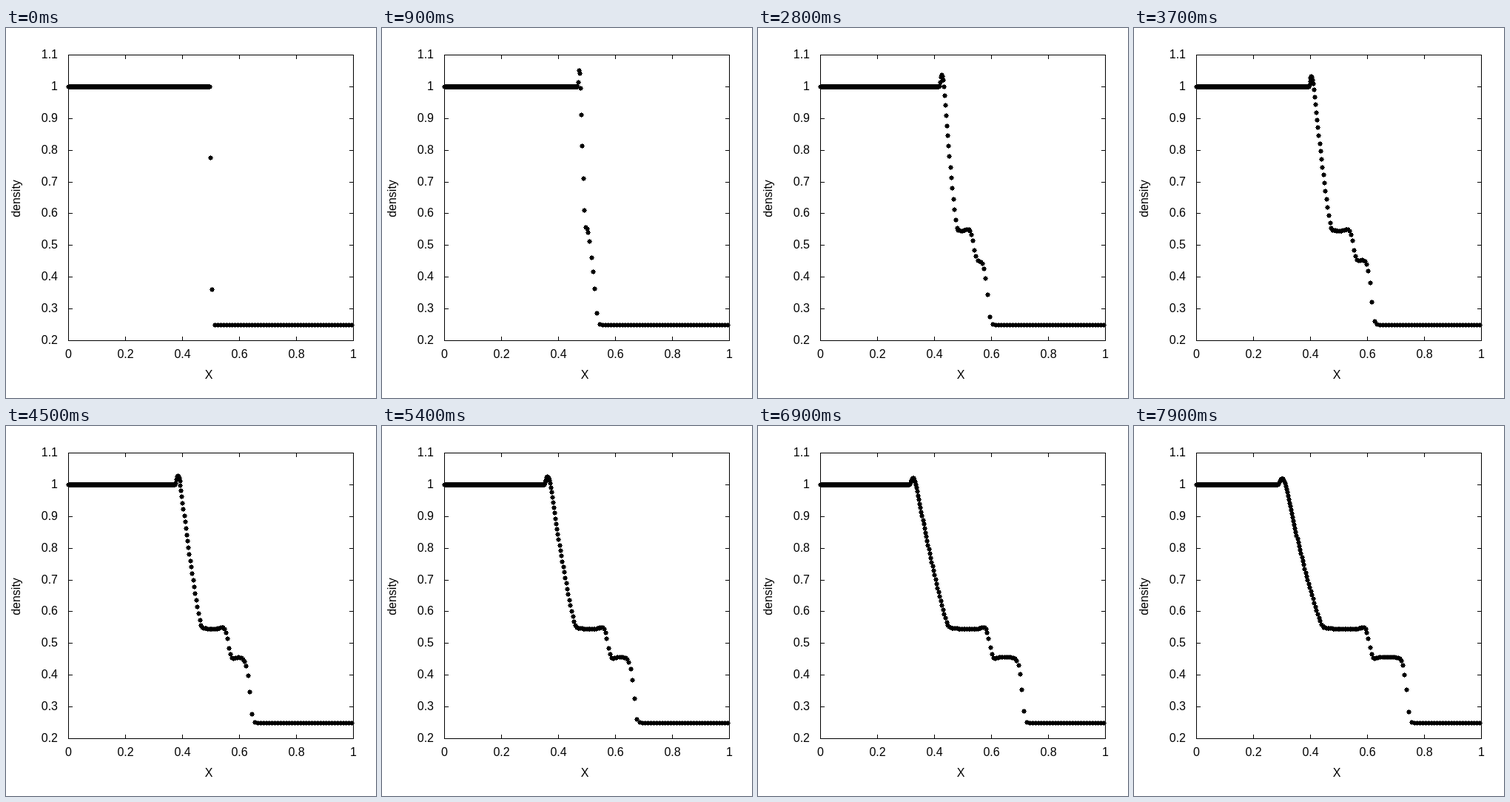
Animation of 500 by 500 pixels, one loop 8 s. Source, as an HTML page with a canvas:

```html
<!DOCTYPE html>
<html lang="en">
<head>
<meta charset="utf-8">
<title>Shock tube density</title>
<style>
html, body { margin: 0; width: 100%; height: 100%; overflow: hidden; background: #fff; }
canvas { display: block; }
</style>
</head>
<body>
<canvas id="plot" width="500" height="500"></canvas>
<script>
const ctx = document.getElementById('plot').getContext('2d');
const LEFT = 84, RIGHT = 469, TOP = 36, BOTTOM = 422;
const WIDTH = RIGHT - LEFT;
const MASS = 0.0025, LEFT_COUNT = 200, RIGHT_COUNT = 50;
const SOUND = 1.1832, CONTACT_SPEED = 0.6735, SHOCK_SPEED = 1.485;

const px = x => Math.round(LEFT + WIDTH * x);
const py = rho => Math.round(BOTTOM - (BOTTOM - TOP) * (rho - 0.2) / 0.9);

// Smoothed Riemann solution after n steps: rarefaction, contact and shock.
function profile(n) {
  n = Math.max(n, 0.01);
  const t = 0.002 * n;
  const spread = 1 - Math.exp(-n / 5);
  const contact = 0.5 + CONTACT_SPEED * t;
  const shock = 0.5 + SHOCK_SPEED * t + 0.003 * spread;

  // Overshoot ahead of the rarefaction, joined to it by a parabola.
  const bump = (1 - Math.exp(-n / 3)) / (13.7 + 0.476 * n);
  const lead = 0.0015 * Math.sqrt(n);
  const peak = 0.5 - SOUND * t - lead;
  const slope = 5 / (6 * SOUND * t);
  const curve = slope * slope / (4 * (slope * lead - bump));

  function fan(x) {
    const y = x - peak;
    if (y < -lead) return 1;
    if (y < 0) return 1 + bump * (1 + Math.cos(Math.PI * y / lead)) / 2;
    if (y < slope / (2 * curve)) return 1 + bump - curve * y * y;
    const base = 5 / 6 - (x - 0.5) / (6 * SOUND * t);
    const a = Math.min(1, Math.max(0.85, base)) ** 5, b = 0.545;
    return (a + b + Math.hypot(a - b, 0.022)) / 2;
  }

  return x => {
    const z = (x - contact) / (0.0095 * spread);
    const step = Math.tanh(z) + 0.13 * z ** 3 * Math.exp(-z * z / 2);
    const d = (x - shock) * WIDTH / spread;
    const front = (1 - Math.tanh(d / 5 + (d > 0 ? 0.026 * d * d : 0))) / 2;
    return 0.25 + (fan(x) - 0.045 * (1 + step) - 0.25) * front;
  };
}

// Equal-mass particles, spaced by the density, starting from one wall.
function march(rho, x, dir, count, visit) {
  for (let i = 0; i < count; i++) {
    visit(x, rho(x), i === count - 1);
    const half = x + dir * MASS / rho(x) / 2;
    x += dir * MASS / rho(half);
  }
}

function marker(x, y) {
  const cx = px(x), cy = py(y);
  ctx.fillRect(cx - 3, cy, 7, 1);
  ctx.fillRect(cx - 2, cy - 2, 5, 5);
  ctx.fillRect(cx, cy - 3, 1, 7);
}

function label(text, x, y, align) {
  ctx.textAlign = align;
  ctx.fillText(text, x, y);
}

function axes() {
  ctx.font = '16px "Liberation Sans", Arial, sans-serif';
  ctx.strokeRect(LEFT + 0.5, TOP + 0.5, WIDTH, BOTTOM - TOP);
  for (let k = 0; k <= 9; k++) {
    const y = py(0.2 + k / 10);
    ctx.fillRect(LEFT, y, 6, 1);
    ctx.fillRect(RIGHT - 5, y, 6, 1);
    label(String((k + 2) / 10), 70, y + 5, 'right');
  }
  for (let k = 0; k <= 5; k++) {
    const x = px(k / 5);
    ctx.fillRect(x, TOP, 1, 6);
    ctx.fillRect(x, BOTTOM - 5, 1, 6);
    label(String(k / 5), x + 0.5, 446, 'center');
  }
  label('X', 274, 474, 'center');
  ctx.save();
  ctx.translate(19, 230.5);
  ctx.rotate(-Math.PI / 2);
  label('density', 0, 0, 'center');
  ctx.restore();
}

function draw(n) {
  ctx.fillStyle = '#fff';
  ctx.fillRect(0, 0, 500, 500);
  ctx.fillStyle = ctx.strokeStyle = '#000';
  axes();
  const rho = profile(n), start = Math.exp(-n / 2);
  const plot = (outer, inner) => (x, value, last) =>
    marker(x, value + ((last ? inner : outer) - value) * start);
  march(rho, MASS / 2, 1, LEFT_COUNT, plot(1, 0.777));
  march(rho, 1 - MASS * 2, -1, RIGHT_COUNT, plot(0.25, 0.36));
}

let shown = -1;
function tick() {
  const n = Math.floor(performance.now() % 8000 / 100);
  if (n !== shown) draw(shown = n);
  requestAnimationFrame(tick);
}
tick();
</script>
</body>
</html>
```
